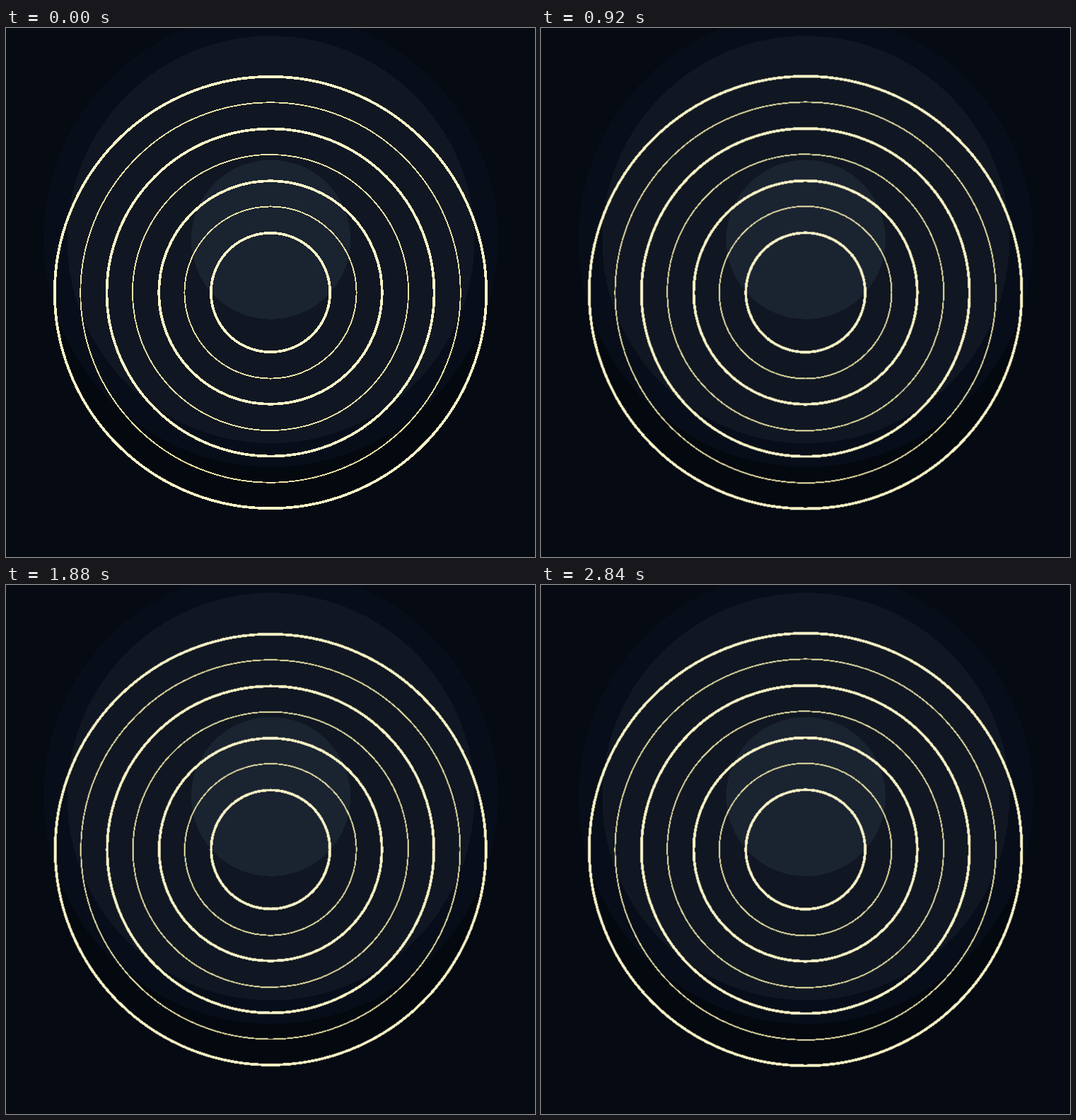
These frames come from a looping animation (748x748 px, 2.88 s). An HTML page:

```html
<!DOCTYPE html>
<html lang="en">
<head>
<meta charset="utf-8">
<title>Breathing rings</title>
<style>
  html, body { margin: 0; width: 100%; height: 100%; overflow: hidden; background: #050a13; }
  svg { display: block; width: 100vw; height: 100vh; shape-rendering: crispEdges; }
  .pulse { transform-origin: 374px 374px; animation: pulse 2880ms infinite; }
  .rings { fill: none; }
  .thick { stroke: #fef6c8; stroke-width: 3.74; }
  .thin { stroke: #ede5a8; stroke-width: 1.87; }

  /* one and a half sine periods, mirrored at the loop point */
  @keyframes pulse {
    0% { transform: scale(1); animation-timing-function: cubic-bezier(.318, .5, .6358, 1); }
    16.6667% { transform: scale(1.016); animation-timing-function: cubic-bezier(.3642, 0, .6358, 1); }
    50% { transform: scale(.984); animation-timing-function: cubic-bezier(.3642, 0, .6358, 1); }
    83.3333% { transform: scale(1.016); animation-timing-function: cubic-bezier(.3642, 0, .682, .5); }
    100% { transform: scale(1); }
  }
</style>
</head>
<body>
<svg viewBox="0 0 748 748">
  <rect width="748" height="748" fill="#050a13"/>
  <circle class="pulse" cx="374" cy="374" r="305.2" fill="#04080f"/>
  <g class="glow">
    <circle cx="374.5" cy="299.2" r="321.5" fill="#070e19"/>
    <circle cx="374.5" cy="299.2" r="288" fill="#101722"/>
    <circle cx="374.5" cy="299.2" r="112.6" fill="#1a2330"/>
  </g>
  <g class="pulse rings">
    <g class="thick">
      <circle cx="374" cy="374" r="84.2"/>
      <circle cx="374" cy="374" r="157.8"/>
      <circle cx="374" cy="374" r="231.5"/>
      <circle cx="374" cy="374" r="305.2"/>
    </g>
    <g class="thin">
      <circle cx="374" cy="374" r="121.6"/>
      <circle cx="374" cy="374" r="195.1"/>
      <circle cx="374" cy="374" r="268.7"/>
    </g>
  </g>
</svg>
</body>
</html>
```
